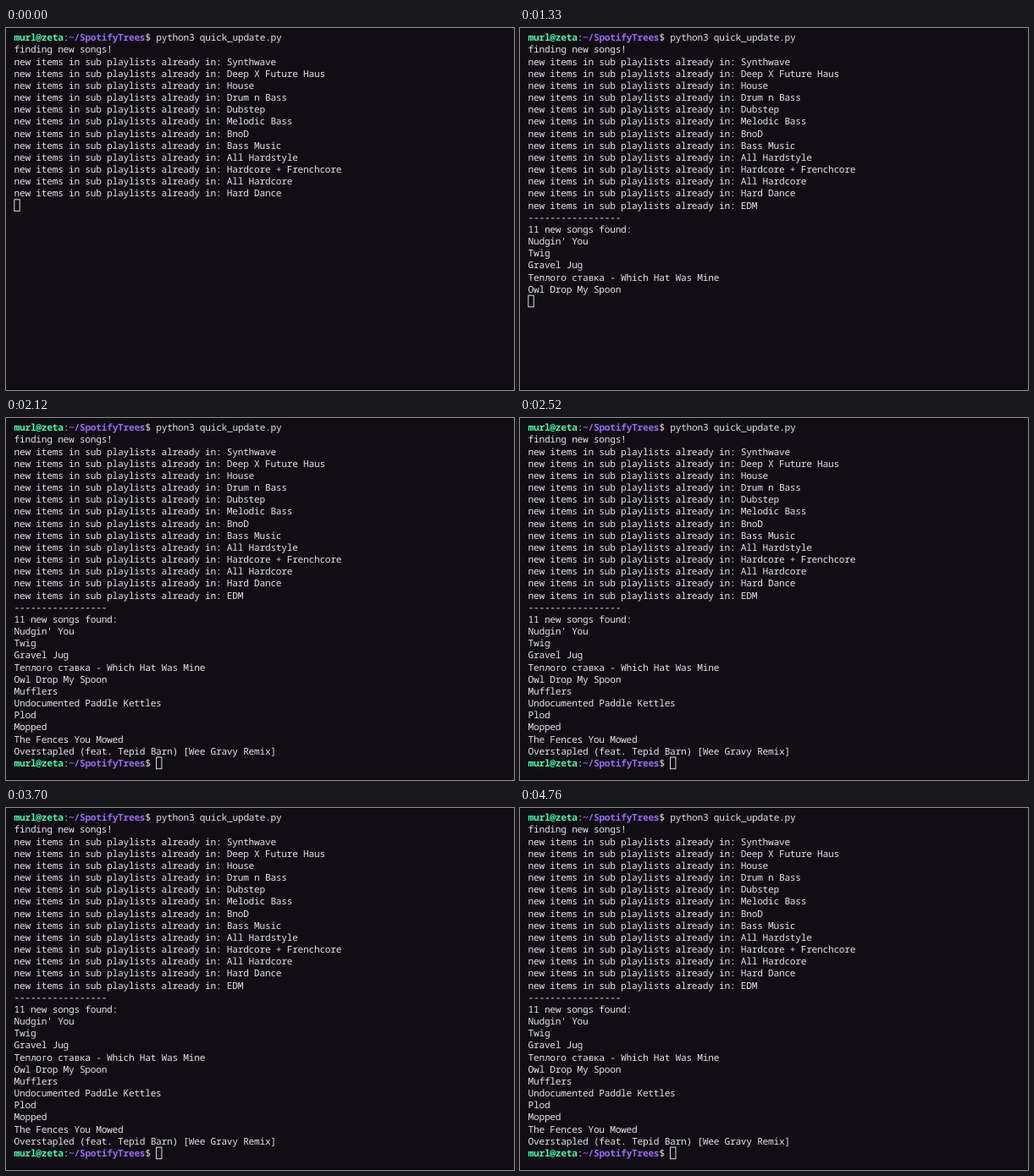
Animation, 600 px wide and 428 px high, one loop 4790 ms. Source, as an HTML page:

```html
<!DOCTYPE html>
<html lang="en">
<head>
<meta charset="utf-8">
<title>Terminal</title>
<style>
  html, body { margin: 0; width: 100%; height: 100%; overflow: hidden; background: #100e14; }
  svg { display: block; width: 600px; height: 428px; }
  text {
    font: 11.2px "Noto Sans Mono", "DejaVu Sans Mono", monospace;
    letter-spacing: -0.27px;
    font-variant-ligatures: none;
    text-rendering: geometricPrecision;
    white-space: pre;
    fill: #e4e2e6;
  }
  .user { fill: #4df5b0; font-weight: 700; }
  .path { fill: #9c69f2; font-weight: 700; }
  #cursor { fill: none; stroke: #dddbe0; stroke-width: 1; }
</style>
</head>
<body>
<svg viewBox="0 0 600 428">
  <rect width="600" height="428" fill="#100e14"/>
  <rect width="600" height="1" fill="#08070a"/>
  <rect y="427" width="600" height="1" fill="#08070a"/>
  <g id="screen"></g>
  <rect id="cursor" width="6.4" height="13.6"/>
</svg>
<script>
const LOOP = 4790, LEFT = 9.6, BASE = 15.3, CELL = 6.45, ROW = 14.165;
const FOUND = 910, STEP = 100, DONE = 2020;
const PROMPT = [["murl@zeta", "user"], [":"], ["~/SpotifyTrees", "path"], ["$ "]];

const playlists = ["Synthwave", "Deep X Future Haus", "House", "Drum n Bass", "Dubstep",
  "Melodic Bass", "BnoD", "Bass Music", "All Hardstyle", "Hardcore + Frenchcore",
  "All Hardcore", "Hard Dance", "EDM"];
const songs = ["Nudgin' You", "Twig", "Gravel Jug", "Теплого ставка - Which Hat Was Mine",
  "Owl Drop My Spoon", "Mufflers", "Undocumented Paddle Kettles", "Plod", "Mopped",
  "The Fences You Mowed", "Overstapled (feat. Tepid Barn) [Wee Gravy Remix]"];

const plain = (text, at) => ({ parts: [[text]], at });
const lines = [
  { parts: [...PROMPT, ["python3 quick_update.py"]], at: 0 },
  plain("finding new songs!", 0),
  ...playlists.map(name =>
    plain("new items in sub playlists already in: " + name, name === "EDM" ? FOUND : 0)),
  plain("-".repeat(17), FOUND),
  plain(songs.length + " new songs found:", FOUND),
  ...songs.map((song, i) => plain(song, FOUND + i * STEP)),
  { parts: PROMPT, at: DONE }
];

const make = (tag, parent) =>
  parent.appendChild(document.createElementNS("http://www.w3.org/2000/svg", tag));
const screen = document.getElementById("screen");
const cursor = document.getElementById("cursor");

lines.forEach((line, row) => {
  line.node = make("text", screen);
  line.node.setAttribute("y", BASE + row * ROW);
  let col = 0;
  for (const [text, style] of line.parts) {
    const span = make("tspan", line.node);
    span.setAttribute("x", LEFT + col * CELL);
    if (style) span.setAttribute("class", style);
    span.textContent = text;
    col += text.length;
  }
});

const promptWidth = PROMPT.reduce((sum, [text]) => sum + text.length, 0);

function draw(time) {
  let shown = 0;
  for (const { node, at } of lines) {
    const visible = time >= at;
    node.setAttribute("visibility", visible ? "visible" : "hidden");
    shown += visible;
  }
  const done = time >= DONE;
  const row = done ? lines.length - 1 : shown;
  cursor.setAttribute("x", LEFT + 0.2 + (done ? promptWidth * CELL : 0));
  cursor.setAttribute("y", BASE + row * ROW - 10.8);
}

const start = performance.now();
function tick() {
  draw((performance.now() - start) % LOOP);
  requestAnimationFrame(tick);
}
tick();
</script>
</body>
</html>
```
